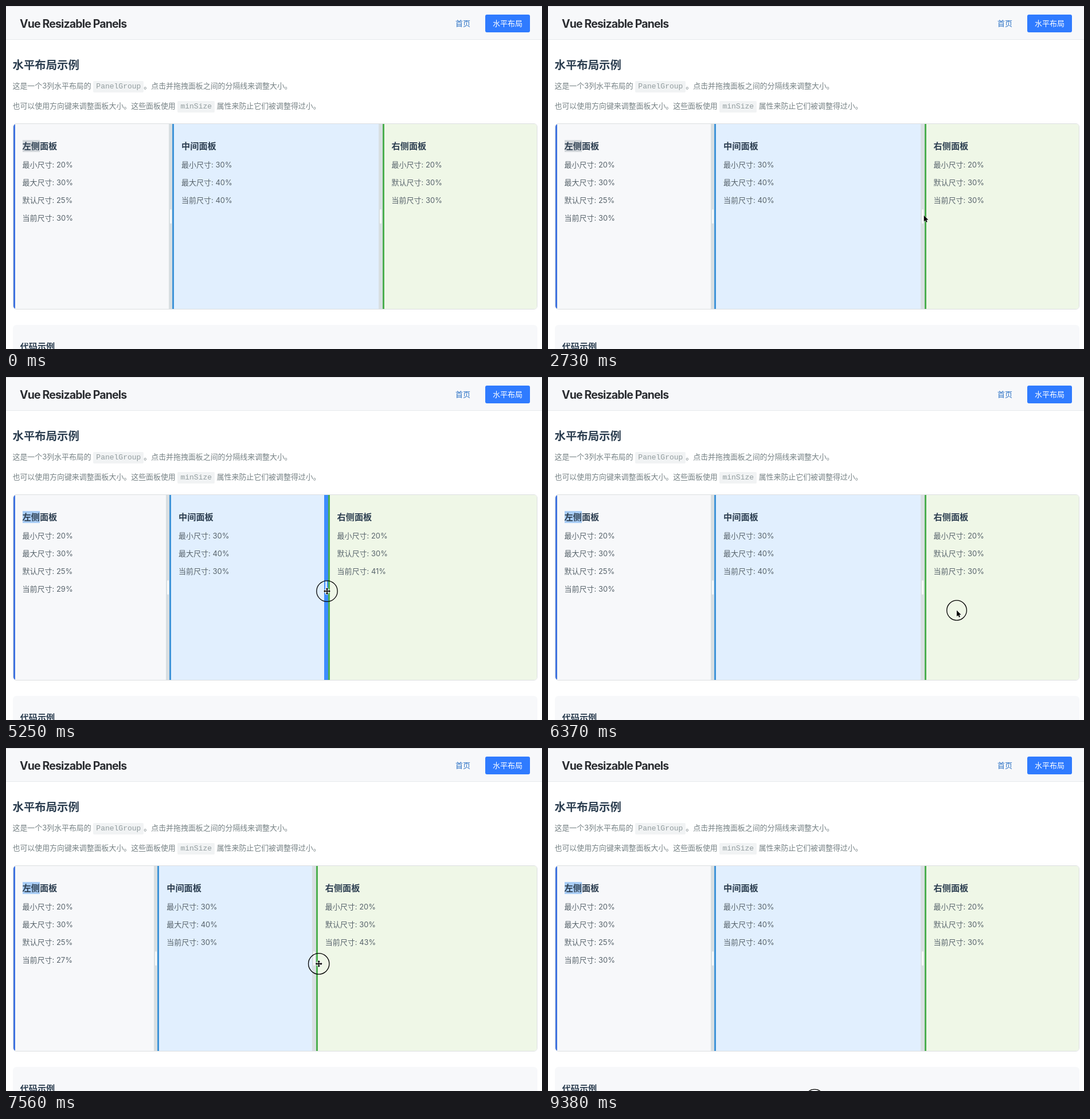
These frames come from a looping animation (935 by 599 pixels, 9.45 s). An HTML page:

```html
<!DOCTYPE html>
<html lang="zh-CN">
<head>
<meta charset="utf-8">
<title>Vue Resizable Panels</title>
<style>
  html, body { margin: 0; width: 100%; height: 100%; overflow: hidden; background: #fff; }
  #stage {
    position: relative; width: 935px; height: 599px; overflow: hidden;
    font: 13px/20px Inter, "Noto Sans CJK SC", "Noto Sans CJK", sans-serif;
    color: #758184; white-space: nowrap;
  }
  #stage * { box-sizing: border-box; }
  header {
    position: absolute; inset: 0 0 auto; height: 59px; background: #f7f8fa;
    border-top: 1px solid #dfe1e4; border-bottom: 1px solid #e6e9ec;
  }
  header > *, h2, .line { position: absolute; margin: 0; }
  h1 { left: 24px; top: 15px; font-size: 19.5px; line-height: 30px; font-weight: 700; letter-spacing: -.85px; color: #2b2d31; }
  .home { left: 784px; top: 19px; color: #2f74c6; }
  .here { left: 836px; top: 14px; width: 78px; line-height: 31px; text-align: center; color: #fff; background: #2f7bff; border-radius: 3px; }
  h2, h3 { color: #2c3e50; font-weight: 600; }
  h2 { left: 11.5px; top: 88px; font-size: 19.4px; line-height: 30px; }
  h3 { font-size: 15.2px; line-height: 21px; }
  .line { left: 11.5px; font-size: 12.93px; }
  code {
    display: inline-block; padding: 0 5px; background: #f1f3f4; border-radius: 2px;
    font: 13px/20px "Liberation Mono", monospace; color: #929d9f;
  }
  #group {
    position: absolute; left: 12px; top: 205px; width: 915px; height: 325px;
    display: flex; overflow: hidden; border: 1px solid #dcdfe1; border-radius: 6px;
  }
  .panel { position: relative; flex: none; overflow: hidden; padding: 28px 0 0 16px; color: #58646c; }
  .panel::before { content: ""; position: absolute; inset: 0 auto 0 0; width: 3px; background: var(--edge); }
  .panel h3 { position: relative; margin: 0 0 12px; }
  .panel p { margin: 0 0 11px; }
  .panel b { font-weight: 400; }
  #left { --edge: #3f73e0; background: #f7f8fa; padding-left: 15.5px; }
  #mid { --edge: #3f94d8; background: #e1effe; }
  #right { --edge: #4caf50; background: #eff7e7; flex: 1; }
  #mark { background: #d4d8dc; display: inline-block; }
  .handle { position: relative; flex: none; width: 6.5px; background: #d8dfe2; }
  .handle i { position: absolute; inset: 0; background: #3b8cff; opacity: 0; }
  .handle::after {
    content: ""; position: absolute; left: 2px; top: 149px; width: 3px; height: 25px;
    border-radius: 1.5px; background: rgba(255, 255, 255, .8);
  }
  #sample { position: absolute; left: 12px; top: 557px; width: 915px; height: 80px; background: #f7f8fa; border-radius: 6px; }
  #sample h3 { margin: 0; position: absolute; left: 12.5px; top: 27px; }
  svg { position: absolute; inset: 0; width: 935px; height: 599px; }
</style>
</head>
<body>
<div id="stage">
  <header>
    <h1>Vue Resizable Panels</h1>
    <span class="home">首页</span>
    <span class="here">水平布局</span>
  </header>
  <h2>水平布局示例</h2>
  <div class="line" style="top:129px">这是一个3列水平布局的 <code>PanelGroup</code>。点击并拖拽面板之间的分隔线来调整大小。</div>
  <div class="line" style="top:164px">也可以使用方向键来调整面板大小。这些面板使用 <code>minSize</code> 属性来防止它们被调整得过小。</div>

  <div id="group">
    <div class="panel" id="left">
      <h3><span id="mark">左侧</span>面板</h3>
      <p>最小尺寸: 20%</p><p>最大尺寸: 30%</p><p>默认尺寸: 25%</p><p>当前尺寸: <b></b></p>
    </div>
    <div class="handle"></div>
    <div class="panel" id="mid">
      <h3>中间面板</h3>
      <p>最小尺寸: 30%</p><p>最大尺寸: 40%</p><p>当前尺寸: <b></b></p>
    </div>
    <div class="handle"><i id="glow"></i></div>
    <div class="panel" id="right">
      <h3>右侧面板</h3>
      <p>最小尺寸: 20%</p><p>默认尺寸: 30%</p><p>当前尺寸: <b></b></p>
    </div>
  </div>

  <div id="sample"><h3>代码示例</h3></div>

  <svg>
    <g id="pointer">
      <circle id="ring" fill="none" stroke="#000" stroke-width="1.3"/>
      <path id="arrow" transform="scale(.92)" d="M0 0V11.6L2.7 9.2L4.4 13.2L6.4 12.3L4.7 8.5H8.3Z" fill="#000" stroke="#fff" paint-order="stroke"/>
      <path id="move" d="M0-6L2.4-3.2H.8V-.8H3.2V-2.4L6 0L3.2 2.4V.8H.8V3.2H2.4L0 6L-2.4 3.2H-.8V.8H-3.2V2.4L-6 0L-3.2-2.4V-.8H-.8V-3.2H-2.4Z" fill="#000" stroke="#fff" stroke-width="1.4" paint-order="stroke"/>
    </g>
  </svg>
</div>
<script>
  const LOOP = 9450, STEP = 70;
  const LAG = 45, GRAB = 4.5;       // the handle trails the pointer
  const UNIT = 9, ORIGIN = 20;      // pixels per percent, handle offset

  // pointer moves: start, end, then the place it settles at
  const moves = [
    [700, 980, 357, 548], [980, 1190, 52, 400], [1400, 2310, 662, 355],
    [2450, 2870, 655, 367], [3220, 3360, 652.5, 367.5],
    [3710, 4340, 440, 372], [4550, 5250, 560, 374], [5250, 5600, 745, 411],
    [5950, 6160, 713, 407.5], [6370, 7070, 441, 375],
    [7210, 7700, 555, 377], [7700, 8190, 704, 401],
    [8470, 8960, 533, 560], [8960, 9030, 500, 640], [9310, 9380, 465, 613.5]
  ];

  const $ = id => document.getElementById(id);
  const clamp = (v, lo, hi) => Math.min(hi, Math.max(lo, v));
  const ramp = (t, from, to) => clamp((t - from) / (to - from), 0, 1);
  const easeOut = p => 1 - (1 - p) ** 2;
  const show = (el, on) => el.setAttribute("visibility", on ? "visible" : "hidden");

  function pointer(t) {
    let x = 430, y = 620;
    for (const [from, to, endX, endY] of moves) {
      const k = easeOut(ramp(t, from, to));
      x += (endX - x) * k;
      y += (endY - y) * k;
    }
    return [x, y];
  }

  function glow(t) {
    const fade = from => ramp(t, from, from + 200);
    return fade(3290) - fade(3970) + fade(4830) - fade(5540);
  }

  function label(id, percent) {
    $(id).querySelector("b").textContent = Math.round(percent) + "%";
  }

  function draw(t) {
    const [x, y] = pointer(t);
    const dragging = t > 3710 && t < 8260;
    const handle = pointer(t - LAG)[0] - GRAB;
    const sum = dragging ? clamp((handle - ORIGIN) / UNIT, 50, 70) : 70;
    const left = Math.min(30, sum - 30);   // the middle shrinks first
    $("left").style.width = left * UNIT + .5 + "px";
    $("mid").style.width = (sum - left) * UNIT + "px";
    label("left", left);
    label("mid", sum - left);
    label("right", 100 - sum);

    $("mark").style.background = t < 3010 ? "#d4d8dc" : "#a9cdf5";
    $("glow").style.opacity = glow(t);

    const gap = x - (ORIGIN + sum * UNIT);
    const moving = t > 3220 && gap > -4 && gap < 12;
    $("pointer").setAttribute("transform", `translate(${x} ${y})`);
    $("ring").setAttribute("r", moving ? 18.2 : 17.3);
    show($("ring"), t >= 3640 || (t >= 3010 && t < 3150));
    show($("move"), moving);
    show($("arrow"), !moving);
  }

  const start = performance.now();
  function tick() {
    const t = (performance.now() - start) % LOOP;
    draw(Math.floor(t / STEP) * STEP);
    requestAnimationFrame(tick);
  }
  tick();
</script>
</body>
</html>
```
